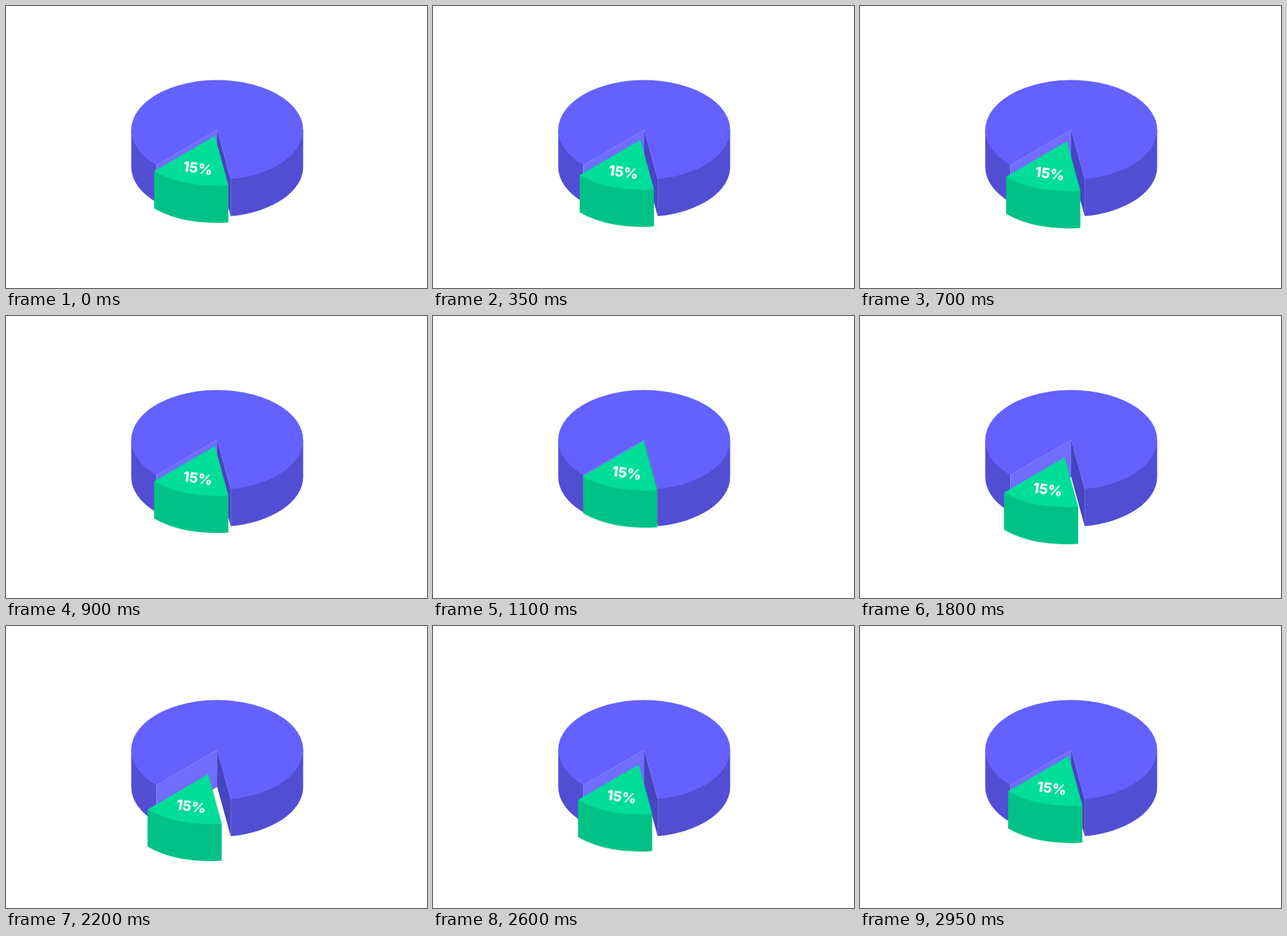
Recreate the animation shown at these times as an HTML page. Size 600 px wide and 402 px high, loop 3000 ms.

```html
<!DOCTYPE html>
<html lang="en">
<head>
<meta charset="utf-8">
<title>Pie chart</title>
<style>
  html, body { margin: 0; width: 100%; height: 100%; overflow: hidden; background: #fff; }
  svg { display: block; width: 100%; height: 100%; }
  .top { fill: #6461ff; }
  .side { fill: #514ed4; }
  .lit { fill: #706dff; }
  .dark { fill: #4744c1; }
  .slice-top { fill: #00dd97; }
  .slice-side { fill: #00c286; }
  text { font: 800 20px Inter, "Open Sans", sans-serif; fill: #fff; text-anchor: middle; }
  .slice { animation: slide 3s cubic-bezier(.5, 0, .5, 1) infinite; }
  @keyframes slide {
    0%, 100% { transform: translate(-3.3px, 8.8px); }
    20% { transform: translate(-6.4px, 17.3px); }
    40% { transform: translate(-.3px, .7px); }
    72.7% { transform: translate(-12.8px, 34.8px); }
  }
</style>
</head>
<body>
<svg viewBox="0 0 600 402">
  <!-- Outer walls, notch walls, lid -->
  <path class="side" d="M178.5 176.5v53A122.5 71 0 0 0 214.4 279.7v-53z"/>
  <path class="side" d="M423.5 176.5v53A122.5 71 0 0 1 320.2 299.6v-53z"/>
  <path class="lit" d="M301 176.5v53L214.4 279.7v-53z"/>
  <path class="dark" d="M301 176.5v53L320.2 299.6v-53z"/>
  <path class="top" d="M301 176.5L214.4 226.7A122.5 71 0 1 1 320.2 246.6z"/>

  <g class="slice">
    <path class="slice-side" d="M214.4 226.7v53A122.5 71 0 0 0 320.2 299.6v-53z"/>
    <path class="slice-top" d="M301 176.5L214.4 226.7A122.5 71 0 0 0 320.2 246.6z"/>
    <text transform="translate(276.5 222.4) rotate(8)" y="7">15%</text>
  </g>
</svg>
</body>
</html>
```
